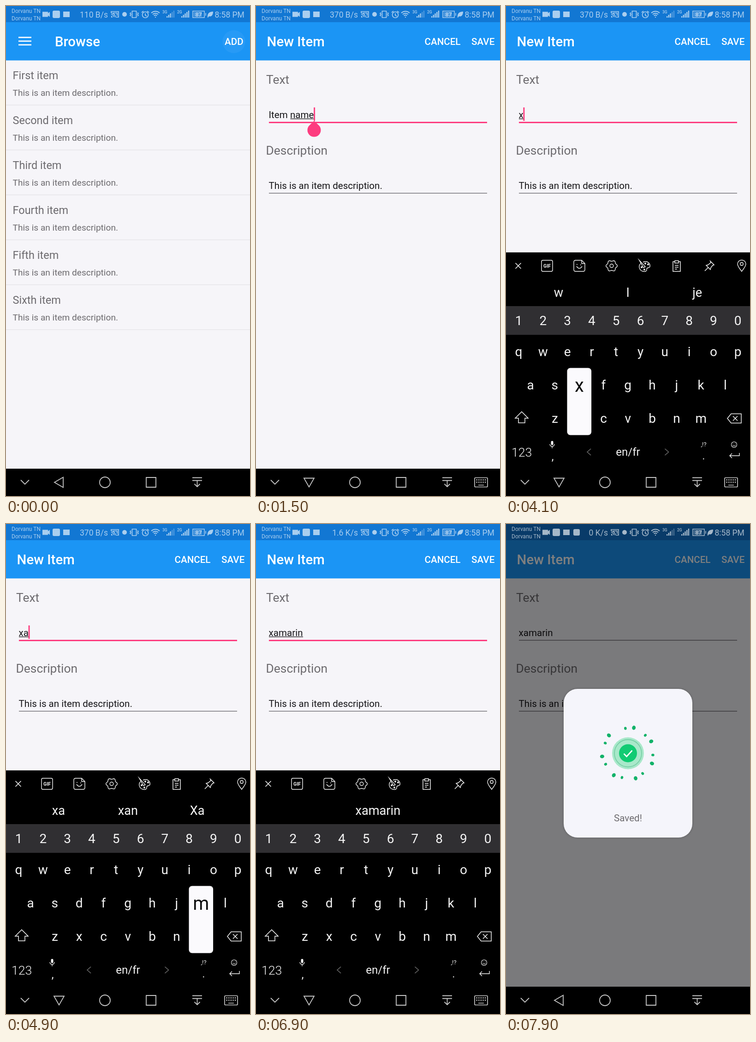
These frames come from a looping animation (529 by 1058 pixels, 8 s). An HTML page with a canvas:

```html
<!DOCTYPE html>
<html lang="en">
<head>
<meta charset="utf-8">
<title>New item</title>
<style>
html, body { margin: 0; width: 100%; height: 100%; overflow: hidden; background: #000; }
canvas { display: block; }
</style>
</head>
<body>
<canvas id="stage" width="529" height="1058"></canvas>
<script>
const ctx = document.getElementById('stage').getContext('2d');
const LOOP = 8000, STEP = 100;
const BG = '#f6f5f9', BLUE = '#1b95f5', GREY = '#6d6b6f', PINK = '#fd3c7f', INK = '#161518';
const STATUS = 'rgba(255,255,255,.64)', NAV = '#c6c6c6', KEY = '#f4f4f4';

// Timed states: [start, value]
const NAME = [[0, 'Item name'], [2800, 'Item '], [3200, ''], [4100, 'x'], [4500, 'xa'], [5000, 'xam'],
  [5400, 'xama'], [5800, 'xamar'], [6000, 'xamari'], [6400, 'xamarin']];
const HINTS = [[0, 'names,name,name is'], [2800, 'is,de,to'], [3200, 'w,I,je'], [4300, 'x,xx,X'],
  [4600, 'xa,xan,Xa'], [5000, 'xam,Xam,exam'], [5500, 'xamarin,xama,Xebul'], [6000, 'xamarin,xamari,Xamarin'],
  [6500, ',xamarin,']];
const SPEED = [[0, '110 B/s'], [300, '370 B/s'], [5600, '1.6 K/s'], [7400, '0 K/s']];
const PRESSES = [[4100, 'x'], [4300, ''], [4400, 'a'], [4600, ''], [4800, 'm'], [5000, ''], [5300, 'a'],
  [5500, ''], [5700, 'r'], [5900, 'i'], [6000, ''], [6200, 'n'], [6400, '']];
const ROWS = [['1234567890', 27.5, 689], ['qwertyuiop', 27.5, 756], ['asdfghjkl', 53, 828], ['zxcvbnm', 106, 900]];
const KEY_STEP = 52.8;

const entryAt = (list, t) => list.filter(e => e[0] <= t).pop() || [0, ''];
const clamp = v => Math.max(0, Math.min(1, v));

function text(str, x, y, size, color, align = 'left', weight = 400) {
  ctx.font = `${weight} ${size}px Roboto, sans-serif`;
  ctx.textAlign = align;
  ctx.fillStyle = color;
  ctx.fillText(str, x, y);
}
function rect(x, y, w, h, color, radius = 0) {
  ctx.fillStyle = color;
  ctx.beginPath();
  ctx.roundRect(x, y, w, h, radius);
  ctx.fill();
}
function disc(x, y, r, color) {
  ctx.fillStyle = color;
  ctx.beginPath();
  ctx.arc(x, y, r, 0, 7);
  ctx.fill();
}
function ring(x, y, r, color, width) {
  ctx.strokeStyle = color;
  ctx.lineWidth = width;
  ctx.beginPath();
  ctx.arc(x, y, r, 0, 7);
  ctx.stroke();
}
// Path drawn around (x, y); width 0 fills it
function icon(d, x, y, color, width = 1.6) {
  const path = new Path2D(d);
  ctx.save();
  ctx.translate(x, y);
  ctx.strokeStyle = ctx.fillStyle = color;
  ctx.lineWidth = width;
  width ? ctx.stroke(path) : ctx.fill(path);
  ctx.restore();
}
function ripple(x, p) {
  ctx.save();
  ctx.beginPath();
  ctx.rect(0, 35, 529, 83);
  ctx.clip();
  disc(x, 77, 22 + 22 * p, `rgba(255,255,255,${0.13 * Math.sin(Math.PI * p)})`);
  ctx.restore();
}

function drawBrowse(t) {
  rect(0, 35, 529, 964, BG);
  rect(0, 35, 529, 82.5, BLUE);
  for (const y of [68, 76, 84]) rect(27, y - 1.5, 28, 2.7, '#fff');
  text('Browse', 106, 87, 29.4, '#fff', 'left', 500);
  ripple(494, clamp((t + 100) / 800));
  text('ADD', 474, 84, 20.6, '#fff', 'left', 500);
  ['First', 'Second', 'Third', 'Fourth', 'Fifth', 'Sixth'].forEach((n, i) => {
    const y = 97 * i;
    text(n + ' item', 14.5, y + 157.5, 23.5, GREY);
    text('This is an item description.', 14.5, y + 194, 19.1, GREY);
    rect(0, y + 213, 529, 1.6, '#e7e6ea');
  });
}

function drawForm(t) {
  const [changed, name] = entryAt(NAME, t);
  const focused = t >= 1000 && t < 7200;
  rect(0, 35, 529, 964, BG);
  rect(0, 35, 529, 82.5, BLUE);
  text('New Item', 23.5, 87, 29.4, '#fff', 'left', 500);
  if (t >= 7300) ripple(492, clamp((t - 7200) / 700));
  text('CANCEL', 365.5, 84, 20.6, '#fff', 'left', 500);
  text('SAVE', 467, 84, 20.6, '#fff', 'left', 500);
  text('Text', 22, 168, 26.4, GREY);
  text('Description', 21.5, 321, 26.4, GREY);
  text('This is an item description.', 27.5, 395, 20.6, INK);
  rect(28, 403.6, 473, 1.5, '#77757a');
  text(name, 27.5, 242, 20.6, INK);
  if (!focused) return rect(28, 250.2, 473, 1.5, '#77757a');

  rect(28, 250, 473, 3, PINK);
  const end = 28 + ctx.measureText(name).width;
  const wordStart = 28 + ctx.measureText(name.slice(0, name.lastIndexOf(' ') + 1)).width;
  if (t >= 1300) rect(wordStart, 243, end - wordStart, 1.3, INK);
  const idle = Math.max(0, t - Math.max(1300, changed));
  if (Math.floor(idle / 500) % 2 === 0) rect(end - 0.8, 219, 2.9, 29, PINK);
  if (t >= 1200 && t < 2800) icon('M0-20L10-10.5A14.5 14.5 0 1 1-10-10.5Z', 126, 268, PINK, 0);
}

function drawDialog(t) {
  const shown = clamp((t - 7400) / 250), mark = clamp((t - 7600) / 300);
  rect(0, 0, 529, 999, `rgba(0,0,0,${Math.min(0.5, (t - 7300) * 0.00107)})`);
  ctx.save();
  ctx.globalAlpha = shown;
  ctx.translate(264.5, t < 7800 ? 283 : 516.5);
  ctx.scale(0.65 + 0.35 * shown, 0.65 + 0.35 * shown);
  ctx.shadowColor = 'rgba(0,0,0,.25)';
  ctx.shadowBlur = 5;
  rect(-139.5, -160.5, 279, 321, '#f5f5fb', 30);
  ctx.shadowColor = 'transparent';
  text('Saved!', 0, 125.5, 20.6, GREY, 'center');
  ctx.translate(0, -21.5);
  if (!mark) {
    disc(0, 0, 29, '#fafafc');
    ring(0, 0, 29, '#dddde0', 2.6);
  } else {
    disc(0, 0, 34.5 * mark, '#a9e8ca');
    ring(0, 0, 29.5 * mark, '#77cfa6', 1.8);
    disc(0, 0, 19.5, '#12cb73');
    icon('M-9 1L-3 7L9-6', 0, 0, '#fff', 2.6);
    for (let i = 0; i < 7 && mark > 0.5; i++) {
      for (const [start, dist, r] of [[-77, 56.5, 4.6], [-96, 54, 3.3]]) {
        const a = (start + 50 * i) * Math.PI / 180;
        ctx.fillStyle = '#12b269';
        ctx.beginPath();
        ctx.ellipse(Math.cos(a) * dist * mark, Math.sin(a) * dist * mark, r, r * 0.85, a, 0, 7);
        ctx.fill();
      }
    }
  }
  ctx.restore();
}

function drawSignal(x, label, level) {
  text(label, x, 16, 8.5, STATUS, 'left', 500);
  for (let i = 0; i < 5; i++) {
    const h = 3 + 3 * i;
    rect(x + 9 + i * 3.7, 25 - h, 2.4, h, i < level ? STATUS : 'rgba(255,255,255,.25)');
  }
}

function drawStatus(t) {
  text('Dorvanu TN', 12, 14.5, 12, STATUS);
  text('Dorvanu TN', 12, 30.5, 12, STATUS);
  icon('M-8-5H4V-2L8-5V6L4 3V6H-8Z', 87, 17.5, STATUS, 0);
  rect(101, 10, 16, 16, STATUS, 3);
  rect(124, 12, 14, 12, STATUS);
  if (t >= 7400) rect(146, 11, 14, 14, STATUS, 3);
  text(entryAt(SPEED, t)[1], 221, 24.5, 17.5, STATUS, 'right');
  icon('M-8-3V-6H8V6H2M-8 6H-6A2 2 0 0 0-8 4M-8 0A6 6 0 0 1-2 6M-8-3A9 9 0 0 1 1 6M-4-3H5V3', 236, 18, STATUS, 1.7);
  disc(257, 18, 5, STATUS);
  icon('M-4.5-7H4.5V7H-4.5ZM-7-4L-9-2L-7 0L-9 2L-7 4M7-4L9-2L7 0L9 2L7 4', 278, 18, STATUS, 1.7);
  ring(302, 19, 6.5, STATUS, 1.7);
  icon('M0-3V1L3 3M-8-5L-4-8M8-5L4-8', 302, 19, STATUS, 1.7);
  icon('M-9-3A13 13 0 0 1 9-3M-6 0A9 9 0 0 1 6 0M-3.3 3A5 5 0 0 1 3.3 3M-1 6H1', 324, 18, STATUS, 2);
  drawSignal(339, '3G', 3);
  drawSignal(371, '2G', 5);
  icon('M-13-7H12V7H-13ZM15-3V3', 418, 18, STATUS, 1.5);
  rect(407, 13, 18, 10, 'rgba(255,255,255,.25)');
  text('87', 417.5, 23, 12.5, STATUS, 'center', 500);
  icon('M-6 7C-7-3-1-6 6-6C6 2 2 6-3 4L-5 7Z', 443, 18, STATUS, 0);
  text('8:58 PM', 452.5, 24.5, 17.5, STATUS);
}

function drawTools() {
  icon('M-6-6L6 6M6-6L-6 6', 26.5, 561, KEY);
  icon('M-9-12H9Q12-12 12-9V9Q12 12 9 12H-9Q-12 12-12 9V-9Q-12-12-9-12Z', 89, 561, KEY, 1.4);
  text('GIF', 89, 565, 10.5, KEY, 'center', 700);
  icon('M-8-12H5L12-5V8Q12 12 8 12H-8Q-12 12-12 8V-8Q-12-12-8-12M5-12V-5H12M-6 1Q0 10 6 1M-5-4V-2M3-3V-1', 159, 561, KEY, 1.4);
  ctx.beginPath();
  for (let a = 0; a < 6.28; a += 0.1) {
    const r = 11 + 1.3 * Math.cos(6 * a + Math.PI);
    ctx.lineTo(229 + r * Math.sin(a), 561 - r * Math.cos(a));
  }
  ctx.closePath();
  ctx.strokeStyle = KEY;
  ctx.lineWidth = 1.4;
  ctx.stroke();
  ring(229, 561, 3.8, KEY, 1.4);
  icon('M-3-9C7-13 13-6 12 1C11 4 5 2 5 6C6 11 1 12-3 11C-11 9-14-1-8-6M-11-13L2 1L-2 3Z', 300, 562, KEY, 1.4);
  for (const [x, y] of [[294, 564], [300, 569], [302, 556], [308, 558]]) disc(x, y, 2, KEY);
  icon('M-4-9H-8V12H8V-9H4M-4-11H4V-6H-4ZM-4-1H4M-4 3H4M-4 7H1', 370, 561, KEY, 1.5);
  icon('M2-10L10-2L7-1L3 4L2 8L-7-1L-3-2L3-7ZM-3 4L-10 11', 441, 561, KEY, 1.5);
  icon('M0 12C-5 5-9 1-9-4A9 8.5 0 0 1 9-4C9 1 5 5 0 12Z', 511, 561, KEY, 1.4);
  ring(511, 557, 3.2, KEY, 1.4);
}

function drawKeyboard(t) {
  const slide = t < 1700 ? 200 : t < 1800 ? 40 : t >= 7800 ? 320 : t >= 7700 ? 90 : 0;
  const pressed = entryAt(PRESSES, t)[1];
  ctx.save();
  ctx.translate(0, slide);
  rect(0, 532, 529, 470, '#000');
  drawTools();
  entryAt(HINTS, t)[1].split(',').forEach((word, i) => {
    ctx.font = '400 27.2px Roboto, sans-serif';
    const size = 27.2 * Math.min(1, (i === 1 ? 120 : 90) / ctx.measureText(word).width);
    text(word, 114 + 150.3 * i, 628, size, KEY, 'center');
  });
  rect(0, 648, 529, 62, '#302f32');
  if (t >= 2300 && t < 3500) rect(463, 857, 63, 67, '#646266', 7);
  for (const [keys, x, y] of ROWS)
    [...keys].forEach((k, i) => text(k, x + KEY_STEP * i, y, 28, KEY, 'center'));

  icon('M0-13L14 1H7V11H-7V1H-14Z', 34, 889, KEY, 1.5);
  icon('M-15 0L-7-10H15V10H-7ZM-3-5L7 5M7-5L-3 5', 495, 890.5, KEY, 1.5);
  text('123', 12, 973, 26.7, KEY, 'left', 300);
  rect(97.5, 939, 5, 9, KEY, 2.5);
  icon('M-5-1A5 5 0 0 0 5-1M0 4V8', 100, 947, KEY, 1.3);
  text(',', 101, 981, 24, KEY, 'center');
  icon('M4-7L-4 0L4 7', 180, 963, '#777', 1.3);
  text('en/fr', 264.5, 971, 24, KEY, 'center');
  icon('M-4-7L4 0L-4 7', 348.5, 963, '#777', 1.3);
  text(',!?', 428.5, 951, 13, KEY, 'center');
  text('.', 428.5, 979, 22, KEY, 'center');
  ring(494.5, 947, 6, KEY, 1.1);
  icon('M-3 1Q0 5 3 1M-2-2V-1M2-2V-1', 494.5, 947, KEY, 1.1);
  icon('M11-6V0H-10M-5-5L-10 0L-5 5', 495, 971, KEY, 1.4);

  const row = pressed && ROWS.find(r => r[0].includes(pressed));
  if (row) {
    const x = row[1] + KEY_STEP * row[0].indexOf(pressed), top = row[2] - 118.5;
    rect(x - 26.3, top, 52.6, 145, '#fbfafd', 7);
    text(pressed, x, top + 51, 40, '#0c0c0d', 'center');
  }
  ctx.restore();
}

function drawNav(t) {
  const typing = t >= 1100 && t < 7200;
  rect(0, 999, 529, 59, '#000');
  icon('M-9-4.5L0 4.5L9-4.5', 41, 1028, NAV, 1.8);
  icon(typing ? 'M-11-9H11L0 10Z' : 'M9-11V11L-10 0Z', 115, 1028.5, NAV, 1.8);
  ring(214.5, 1028.5, 11.5, NAV, 1.8);
  icon('M-10.5-10.5H10.5V10.5H-10.5Z', 314.5, 1028.5, NAV, 1.8);
  icon('M-10.5-9.5H10.5M-10.5-3.5H10.5M0-3.5V10M-6 4L0 10L6 4', 414.5, 1028, NAV, 1.8);
  if (!typing) return;
  icon('M-12-10H12Q14-10 14-8V8Q14 10 12 10H-12Q-14 10-14 8V-8Q-14-10-12-10M-6 6H6', 488, 1028.5, NAV, 1.7);
  for (let i = 0; i < 10; i++) rect(477.5 + (i % 5) * 4.6, 1022 + (i > 4) * 5, 2.4, 2.4, NAV);
}

function draw(t) {
  rect(0, 0, 529, 35.5, '#1277d3');
  if (t < 700) drawBrowse(t);
  if (t >= 500) {
    ctx.save();
    ctx.translate(0, t < 600 ? 300 : t < 700 ? 14 : 0);
    drawForm(t);
    ctx.restore();
  }
  if (t >= 7400) drawDialog(t);
  drawStatus(t);
  if (t >= 1600 && t < 7900) drawKeyboard(t);
  drawNav(t);
}

function frame() {
  const t = performance.now() % LOOP;
  draw(Math.floor(t / STEP) * STEP);
  requestAnimationFrame(frame);
}
frame();
</script>
</body>
</html>
```
